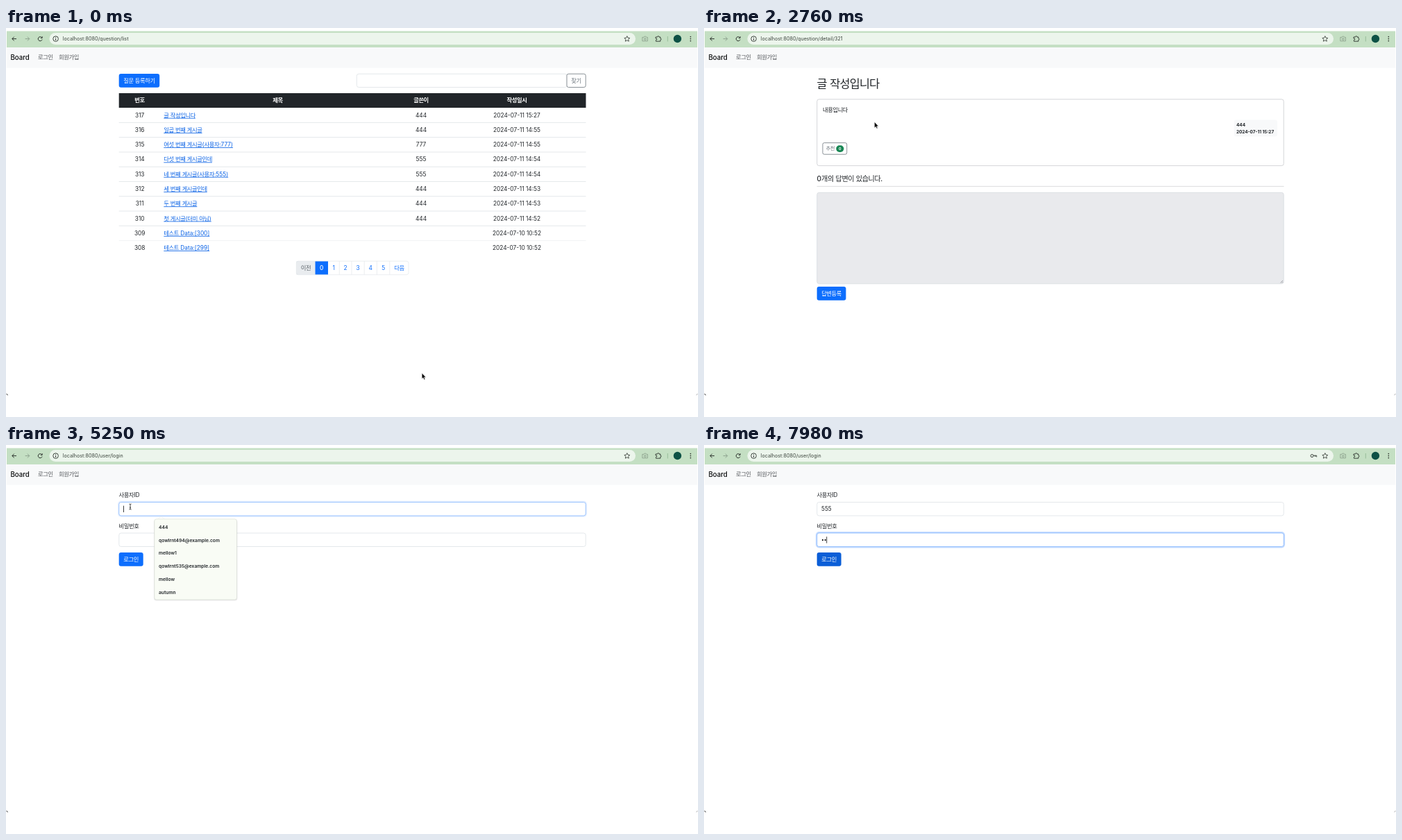
Write an HTML page that moves like this. It is 997 by 561 pixels and loops after 8 s.

```html
<!DOCTYPE html>
<html lang="ko">
<head>
<meta charset="utf-8">
<title>Board</title>
<style>
  html, body { margin: 0; width: 100%; height: 100%; overflow: hidden; background: #fff; }
  svg { display: block; width: 100vw; height: 100vh; }
  text { font-family: Inter, "Noto Sans CJK KR", "Noto Sans CJK", sans-serif; white-space: pre; }
  .ko { letter-spacing: -.05em; }
  .link { text-decoration: underline; text-underline-offset: 1px; text-decoration-thickness: .6px; }
</style>
</head>
<body>
<svg id="stage" viewBox="0 0 997 561" xmlns="http://www.w3.org/2000/svg"></svg>
<script>
const INK = '#212529', BLUE = '#0d6efd', LINE = '#dee2e6', GRAY = '#6c757d';
const LOOP = 8000, REM = 8.3;

// Hangul runs are set slightly tighter than Latin ones.
const runs = s => s.replace(/[가-힣]+/g, '<tspan class="ko">$&</tspan>');

// Text placed by the vertical centre of its line.
function text(x, y, s, { size = REM, fill = INK, weight = 400, anchor = 'start', cls = '' } = {}) {
  return `<text x="${x}" y="${y + size * .36}" font-size="${size}" fill="${fill}" font-weight="${weight}" text-anchor="${anchor}" class="${cls}">${runs(s)}</text>`;
}
const mid = (x, y, s, o = {}) => text(x, y, s, { anchor: 'middle', ...o });

function rect(x, y, w, h, fill, { r = 0, stroke = 'none', sw = .6, id = '' } = {}) {
  return `<rect ${id && `id="${id}"`} x="${x}" y="${y}" width="${w}" height="${h}" rx="${r}" fill="${fill}" stroke="${stroke}" stroke-width="${sw}"/>`;
}
const line = (d, stroke = INK, sw = 1, extra = '') =>
  `<path d="${d}" fill="none" stroke="${stroke}" stroke-width="${sw}" ${extra}/>`;
const group = (id, ...parts) => `<g id="${id}">${parts.join('')}</g>`;
const button = (x, y, w, label, id) =>
  rect(x, y, w, 19.7, BLUE, { r: 3, id }) + mid(x + w / 2, y + 9.8, label, { fill: '#fff', weight: 500 });

function chrome() {
  const round = 'stroke-linecap="round" stroke-linejoin="round"';
  return [
    rect(1, 4.5, 995, 23.5, '#c4dfc3'),
    rect(62.5, 7, 844.5, 17, '#ecf5ec', { r: 8.5 }),
    line('M15 15.6H9M11.7 12.7L8.8 15.6L11.7 18.5', '#2c332d', 1),
    line('M27.6 15.6H33.6M30.9 12.7L33.8 15.6L30.9 18.5', '#8ea38f', 1),
    group('reload', line('M51.6 13.8A3 3 0 1 0 52.1 16.6M52.2 12.2V14.4H50', '#2c332d', 1)),
    group('stop', line('M46.7 13.1L51.7 18.1M51.7 13.1L46.7 18.1', '#2c332d', 1)),
    '<circle cx="71.6" cy="15.6" r="3.8" fill="none" stroke="#2c332d" stroke-width=".9"/>',
    line('M71.6 15.2V17.8M71.6 13.2V14.2', '#2c332d', 1),
    line('M894.8 11.6L896 14.2L898.8 14.5L896.7 16.4L897.3 19.2L894.8 17.8L892.3 19.2L892.9 16.4L890.8 14.5L893.6 14.2Z', '#2c332d', .8),
    group('key',
      '<circle cx="876" cy="15.6" r="2" fill="none" stroke="#3a423b" stroke-width="1"/>',
      line('M878 15.2H882.6V17.4M880.6 15.2V17', '#3a423b', 1)),
    line('M917.2 13.4H919L919.8 12.2H921.9L922.7 13.4H924.4V18.8H917.2Z', '#879b88', .8, round),
    '<circle cx="920.8" cy="16" r="1.4" fill="none" stroke="#879b88" stroke-width=".8"/>',
    line('M936.4 13H938.5Q938.6 11.6 939.7 11.6T940.9 13H942.8V15Q944 15.1 944 16.1T942.8 17.2V19.2H936.4V17.3Q937.8 17.2 937.8 16.1T936.4 15Z', '#2c332d', .9, round),
    line('M953.3 12V19.5', '#8fb490', .8),
    '<circle cx="967.4" cy="15.5" r="5.7" fill="#0d5145"/>',
    [12.6, 15.6, 18.6].map(y => `<circle cx="986.3" cy="${y}" r=".85" fill="#2c332d"/>`).join(''),
    rect(1, 28, 995, 29.5, '#f8f9fa'),
    text(6.5, 42.7, 'Board', { size: 9.7, weight: 500, fill: '#0b0d0e' }),
    text(46, 42.5, '로그인', { fill: '#55585c' }),
    text(76, 42.5, '회원가입', { fill: '#55585c' }),
    line('M1 527.5Q1.2 529 2.6 529.3', '#0b0d0e', 1),
    line('M996 527.5Q995.8 529 994.6 529.3', '#7b7d80', .7)
  ].join('');
}

function listPage() {
  const rows = [
    ['글 작성입니다', '444', '11 15:27'], ['일곱 번째 게시글', '444', '11 14:55'],
    ['여섯 번째 게시글(사용자:777)', '777', '11 14:55'], ['다섯 번째 게시글인데', '555', '11 14:54'],
    ['네 번째 게시글(사용자:555)', '555', '11 14:54'], ['세 번째 게시글인데', '444', '11 14:53'],
    ['두 번째 게시글', '444', '11 14:53'], ['첫 게시글(더미 아님)', '444', '11 14:52'],
    ['테스트 Data:[300]', '', '10 10:52'], ['테스트 Data:[299]', '', '10 10:52']
  ];
  const heads = [[192.5, '번호'], [391.5, '제목'], [598, '글쓴이'], [736, '작성일시']];
  const body = rows.map(([title, user, date], i) => {
    const y = 125.7 + 21.27 * i;
    return mid(192.7, y, String(317 - i)) +
      text(227.3, y, title, { fill: '#0b63e6', cls: 'link' }) +
      mid(598, y, user) + mid(736, y, '2024-07-' + date) +
      (i < 9 ? line(`M162.7 ${y + 10.7}H835.5`, LINE, i < 8 ? .8 : .4) : '');
  });
  const edges = [418.3, 445.5, 464, 480.3, 498, 516.2, 534.4, 552.8, 580];
  const pages = ['이전', '0', '1', '2', '3', '4', '5', '다음'].map((s, i) => {
    const x = edges[i], w = edges[i + 1] - x;
    const fill = i == 0 ? '#e9ecef' : i == 1 ? BLUE : 'none';
    return rect(x, 336.2, w, 19.6, fill) + (i > 2 ? line(`M${x} 336.2V355.8`, LINE, .6) : '') +
      mid(x + w / 2, 346, s, { fill: i == 0 ? '#5d646b' : i == 1 ? '#fff' : BLUE, weight: i == 1 ? 500 : 400 });
  });
  return group('list',
    button(162.7, 66, 58.5, '질문 등록하기'),
    rect(505.3, 66.2, 303, 19.3, '#fff', { r: 3, stroke: LINE, sw: .8 }),
    rect(808, 66.2, 27.2, 19.3, '#fff', { r: 2.5, stroke: GRAY, sw: .8 }),
    mid(821.5, 75.8, '찾기', { fill: GRAY }),
    rect(162.7, 94, 672.8, 21, INK),
    ...heads.map(([x, s]) => mid(x, 104.3, s, { fill: '#fff', weight: 700 })),
    ...body, ...pages,
    rect(418.3, 336.2, 161.7, 19.6, 'none', { r: 3, stroke: LINE }));
}

function detailPage() {
  const small = { size: 6.4, weight: 700 };
  return group('detail',
    text(162.5, 79.8, '글 작성입니다', { size: 16.4, weight: 500 }),
    rect(162.8, 102.8, 672.4, 95.8, '#fff', { r: 3, stroke: '#c9cbce', sw: .8 }),
    text(171, 117.6, '내용입니다'),
    rect(763.7, 132.5, 62.3, 24, '#f8f9fa', { r: 3 }),
    text(767, 139.3, '444', small),
    text(767, 149.8, '2024-07-11 15:27', small),
    rect(171, 165.6, 34.8, 16.6, '#fff', { r: 2.3, stroke: GRAY, sw: .8 }),
    text(175.8, 173.9, '추천', { size: 7, fill: GRAY }),
    rect(190.3, 169.3, 11.2, 9.6, '#198754', { r: 4.8 }),
    mid(195.9, 174.1, '0', { size: 5.4, fill: '#fff', weight: 700 }),
    text(162.5, 217.5, '0개의 답변이 있습니다.', { size: 10.2, weight: 500 }),
    line('M162.7 228.4H835.5', '#d3d5d7', .8),
    rect(162.8, 237.3, 672.4, 131.5, '#e9eaed', { r: 3, stroke: '#d9dce0', sw: .8 }),
    line('M830.5 367.5L834 364M832.5 367.7L834.2 366', '#74787d', .6),
    button(162.7, 373, 41.8, '답변등록'));
}

function loginPage() {
  const saved = ['444', 'qowlrnt494@example.com', 'mellow1', 'qowlrnt535@example.com', 'mellow', 'autumn'];
  const field = (id, y) =>
    rect(161.9, y - .9, 674.2, 21.3, 'none', { r: 3.8, stroke: BLUE, sw: 2, id: id + 'Ring' }) +
    rect(162.8, y, 672.4, 19.5, '#fff', { r: 3, stroke: LINE, sw: .8, id });
  return group('login',
    text(162.5, 72, '사용자ID'),
    field('user', 82.5),
    `<text id="userText" x="169" y="95.3" font-size="${REM}" fill="${INK}"></text>`,
    text(162.5, 116.6, '비밀번호'),
    field('pass', 127),
    '<circle id="dot1" cx="171" cy="137" r="1.1"/><circle id="dot2" cx="174.7" cy="137" r="1.1"/>',
    button(162.7, 155, 35, '로그인', 'submit'),
    rect(0, 0, .8, 9.4, '#0b0d0e', { id: 'caret' }),
    group('popup',
      rect(213, 107.4, 120.4, 117, 'rgba(0,0,0,.09)', { r: 3.5 }),
      rect(213.8, 106.8, 118.7, 116.2, '#f9fcf5', { r: 3, stroke: '#d5dad2', sw: .6 }),
      line('M218 106.6L223.5 103.6L229 106.6', '#eceeea', .6),
      ...saved.map((s, i) => text(220, 118.6 + 18.7 * i, s, { size: 6.7, weight: 600 }))));
}

const status = (id, w, s) => group(id,
  rect(1, 519.3, w, 10.4, '#bbd8ba', { r: 1 }), text(2.8, 524.4, s, { size: 6.2, fill: '#7a957b' }));

const pointer = () => [
  group('arrow', '<path d="M0 0V8.3L1.9 6.6L3.2 9.5L4.6 8.9L3.3 6.1H5.8Z" fill="#000" stroke="#fff" stroke-width=".5"/>'),
  group('hand', '<path d="M-.9 .5Q0 -.7 .8 .5L1.1 3L4.2 3.6Q5.3 4 5.1 5.3L4.4 8.6H.3L-2.4 5.2Q-2.4 4.2 -1.4 4.5L-.5 5.2Z" fill="#fff" stroke="#000" stroke-width=".7"/>'),
  group('beam', line('M-1.6 -4Q0 -4 0 -3V3Q0 4 -1.6 4M1.6 -4Q0 -4 0 -3M0 3Q0 4 1.6 4M-1 1.2H1', '#1a1c1e', .8))
].join('');

const svg = document.getElementById('stage');
svg.innerHTML = rect(0, 0, 997, 561, '#fff') + chrome() +
  `<text id="url" x="81.7" y="18.2" font-size="7.2" fill="#3c453d"></text>` +
  listPage() + detailPage() + loginPage() +
  status('postLink', 108, 'localhost:8080/question/detail/321') +
  status('loginLink', 80, 'localhost:8080/user/login') +
  group('pointer', pointer());

const el = {};
svg.querySelectorAll('[id]').forEach(n => el[n.id] = n);

const within = (t, ...spans) => spans.some(([a, b]) => t >= a && t < b);
const show = (id, on) => el[id].setAttribute('visibility', on ? 'inherit' : 'hidden');
const ramp = (t, from, len = 150) => Math.min(1, Math.max(0, (t - from) / len));
const smooth = u => u * u * (3 - 2 * u);

// Pointer moves: start, end, x, y
const moves = [
  [480, 1230, 259.3, 127], [2190, 2700, 245.6, 135.6], [3930, 4350, 57, 42],
  [4740, 5100, 179, 89], [7410, 7530, 185, 134], [7680, 7845, 194, 158]
];
function pointerAt(t) {
  let x = 599.2, y = 497.7;
  for (const [a, b, tx, ty] of moves) {
    const u = smooth(ramp(t, a, b - a));
    x += (tx - x) * u;
    y += (ty - y) * u;
  }
  return [x, y];
}

const keys = [5460, 5550, 5640];
const paths = { list: 'question/list', detail: 'question/detail/321', login: 'user/login' };

function drawField(id, focus) {
  el[id + 'Ring'].setAttribute('stroke-opacity', .25 * focus);
  el[id].setAttribute('stroke', focus > 0 ? '#86b7fe' : LINE);
}

function draw(t) {
  const page = t < 1500 ? 'list' : t < 4650 ? 'detail' : 'login';
  for (const p in paths) show(p, p == page);
  el.url.textContent = 'localhost:8080/' + paths[page];

  const loading = within(t, [1380, 1500], [4560, 4650]);
  show('stop', loading);
  show('reload', !loading);
  show('postLink', within(t, [1290, 1500]));
  show('loginLink', within(t, [4380, 4650]));
  show('key', t >= 7590);

  const onPass = t >= 7560;
  drawField('user', ramp(t, 5190) * (1 - ramp(t, 7560)));
  drawField('pass', ramp(t, 7560));
  const typed = keys.filter(k => t >= k).length;
  el.userText.textContent = '5'.repeat(typed);
  const dots = (t >= 7890) + (t >= 7950);
  const login = page == 'login';
  show('dot1', login && dots > 0);
  show('dot2', login && dots > 1);
  show('popup', login && within(t, [5220, keys[0] + 60]));
  show('caret', t >= 5190 && !within(t, [6120, 6600], [7050, 7290]));
  el.caret.setAttribute('x', onPass ? 169 + 3.7 * dots : 169 + 5.2 * typed);
  el.caret.setAttribute('y', onPass ? 132.2 : 87.6);
  const h = ramp(t, 7830, 130);
  el.submit.setAttribute('fill', `rgb(${13 - 2 * h},${110 - 16 * h},${253 - 38 * h})`);

  const [x, y] = pointerAt(t);
  const seen = !within(t, [keys[0], 7410], [7890, LOOP]);
  const hand = within(t, [1200, 1530], [4290, 4800], [7815, LOOP]);
  const beam = !hand && within(t, [5040, 7740]);
  el.pointer.setAttribute('transform', `translate(${x} ${y})`);
  show('hand', seen && hand);
  show('beam', seen && beam);
  show('arrow', seen && !hand && !beam);
}

const start = performance.now();
function tick() {
  draw((performance.now() - start) % LOOP);
  requestAnimationFrame(tick);
}
tick();
</script>
</body>
</html>
```
